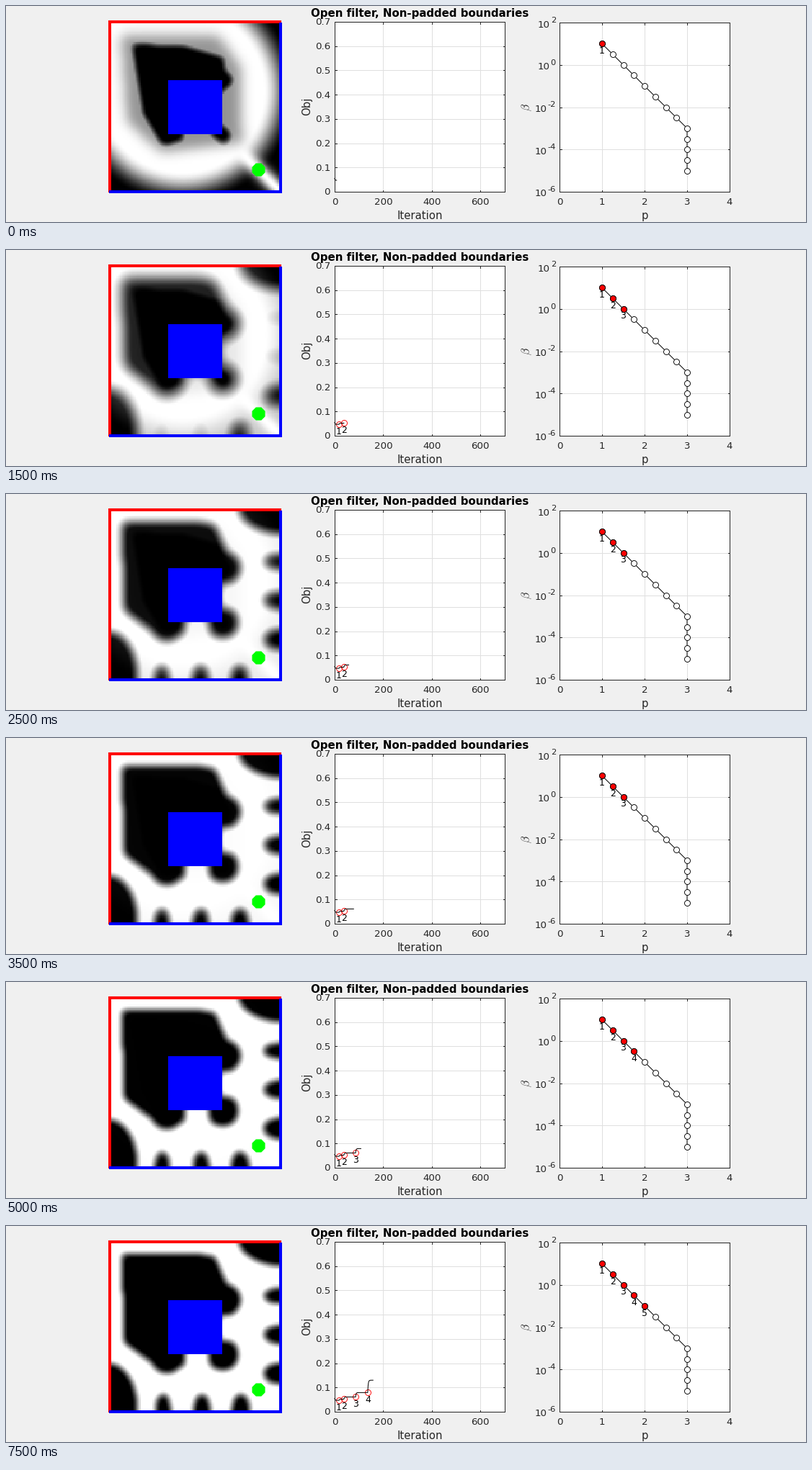
Write a matplotlib script that moves like this. It is 1110x300 px and loops after 8000 ms.

```python
import numpy as np
import matplotlib.pyplot as plt
from matplotlib.animation import FuncAnimation
from matplotlib.path import Path

W, H, DPI = 1110, 300, 100
FRAMES, INTERVAL = 16, 500
PT = 72 / DPI
INK, GRID = "#262626", "#dfdfdf"
plt.rcParams["font.family"] = "DejaVu Sans"
plt.rcParams["mathtext.fontset"] = "cm"

fig = plt.figure(figsize=(W / DPI, H / DPI), dpi=DPI, facecolor="#f0f0f0")
ax = fig.add_axes([0, 0, 1, 1])
ax.axis("off")


def line(xs, ys, color=INK, width=1, z=2, **kw):
    return ax.plot(xs, ys, color=color, lw=width * PT, zorder=z, **kw)[0]


def label(x, y, s, size=13.4, color=INK, ha="center", va="center_baseline", **kw):
    return ax.text(x, y, s, fontsize=size * PT, color=color, ha=ha, va=va,
                   zorder=8, **kw)


# ---- density field, in stage pixels ----------------------------------------
N, CELL, X0, Y0 = 100, 2.37, 144, 22
idx = np.arange(N)
gx, gy = np.meshgrid(X0 + CELL * (idx + 0.5), Y0 + CELL * (idx + 0.5))
centres = np.column_stack([gx.ravel(), gy.ravel()])

CORE_A = np.array([(172, 50), (250, 54), (306, 70), (300, 180), (215, 195), (188, 150)])
CORE_B = np.array([(160, 38), (288, 40), (306, 78), (300, 180), (218, 202), (164, 162)])
HALO = [(160, 42), (295, 42), (326, 85), (328, 190), (215, 203), (168, 160)]
LOBES = [(304, 103), (301, 179), (223, 183)]


def polygon(pts):
    return Path(pts).contains_points(centres).reshape(N, N)


def ellipse(x, y, rx, ry):
    return ((gx - x) / rx) ** 2 + ((gy - y) / ry) ** 2 < 1


def blur(m, sigma):
    k = np.exp(-((idx[:, None] - idx) / sigma) ** 2 / 2)
    k /= k.sum(1, keepdims=True)
    return k @ m @ k.T


def sharpen(m, gain=1.3):
    return np.clip(gain * (m - 0.5) + 0.5, 0, 1)


def core(s):
    """Dark body with three lobes and two bright channels, s from 0 to 1."""
    m = polygon(CORE_A + (CORE_B - CORE_A) * s)
    for x, y in LOBES:
        m |= ellipse(x, y, 13 + 9 * s, 13 + 9 * s)
    m &= ~((gx > 296) & (abs(gy - 142) < 18))
    m &= ~((gy > 170) & (abs(gx - 265) < 17))
    return m.astype(float)


def start_field():
    r = np.clip((np.hypot(gx - 245, gy - 118) - 112) / 45, 0, 1)
    rim = r * r * (3 - 2 * r) * np.clip((gx + gy - 290) / 60, 0, 1)
    rim *= 1 - np.exp(-((gx - gy - 123) / 16) ** 2)
    halo = 0.42 * blur(polygon(HALO), 3.5)
    return np.clip(np.maximum(sharpen(blur(core(0), 2.4)), halo) + rim, 0, 1)


START = start_field()
BODY = np.maximum(core(1), ellipse(385, 10, 66, 46) | ellipse(140, 250, 42, 60))


def late_field(k):
    s = np.clip((k - 5) / 10, 0, 1)
    grow = np.clip((k - 2) / 3, 0, 1)
    m = BODY.copy()
    for i in range(3):
        weight = 1 if i == 2 else grow
        right = ellipse(381, 94 + 54 * i + 3 * s, 24, 11 + 2 * i)
        bottom = ellipse(216 + 54 * i + 2 * s, 259, 11 + i, 22 + 4 * s)
        m = np.maximum(m, weight * (right | bottom))
    return sharpen(blur(m, 2.1 + 1.9 * np.exp(-max(k - 3, 0) / 2.5)))


def picture(k):
    fade = np.exp(-k / 2)
    return 1 - (late_field(k) * (1 - fade) + START * fade)


img = ax.imshow(picture(0), cmap="gray", vmin=0, vmax=1, aspect="auto",
                extent=(X0, X0 + N * CELL, Y0 + N * CELL, Y0),
                interpolation="nearest", zorder=1)
ax.set_xlim(0, W)
ax.set_ylim(H, 0)
ax.set_autoscale_on(False)
ax.fill([225, 300, 300, 225], [103, 103, 178, 178], color="blue", lw=0, zorder=2)
turn = np.pi / 8 + np.arange(8) * np.pi / 4
ax.fill(350.5 + 9.8 * np.cos(turn), 227.5 + 9.8 * np.sin(turn), color="lime",
        lw=0, zorder=2)
edge = dict(width=4, z=3, solid_joinstyle="miter", solid_capstyle="butt")
line([144, 144, 382], [259, 22, 22], "red", **edge)
line([143, 381, 381], [258, 258, 23], "blue", **edge)


# ---- plot panels -----------------------------------------------------------
def panel(x0, y0, x1, y1, xticks, yticks):
    ax.fill([x0, x1, x1, x0], [y0, y0, y1, y1], color="white", lw=0, zorder=1)
    for x in xticks:
        line([x, x], [y0, y1], GRID)
        for y, d in ((y0, 2.5), (y1, -2.5)):
            line([x, x], [y, y + d], z=3)
    for y in yticks:
        line([x0, x1], [y, y], GRID)
        for x, d in ((x0, 2.5), (x1, -2.5)):
            line([x, x + d], [y, y], z=3)
    line([x0, x1, x1, x0, x0], [y0, y0, y1, y1, y0], z=4)


def obj_xy(it, val):
    return 456 + np.asarray(it) * 236 / 700, 258 - np.asarray(val) * 236 / 0.7


def beta_xy(p, power):
    return 768 + np.asarray(p) * 59, 23 + (2 - np.asarray(power)) * 235 / 8


its, vals = np.arange(0, 700, 200), np.arange(8) / 10
panel(456, 22, 692, 258, obj_xy(its, 0)[0], obj_xy(0, vals)[1])
for it in its:
    label(obj_xy(it, 0)[0], 271, str(it))
for v in vals:
    label(450, obj_xy(0, v)[1] - 0.5, f"{v:g}", ha="right")
label(574.5, 15, "Open filter, Non-padded boundaries", 15, "black",
      va="baseline", weight="bold")
label(574.5, 296, "Iteration", 14.9, va="baseline")
label(417.5, 139.5, "Obj", 14.9, rotation=90, va="center")

powers = np.arange(2, -7, -2)
panel(768, 23, 1004, 258, beta_xy(np.arange(5), 0)[0], beta_xy(0, powers)[1])
for p in range(5):
    label(beta_xy(p, 0)[0], 271, str(p))
for e in powers:
    y = beta_xy(0, e)[1]
    label(763 - 4.2 * len(str(e)) - 3.8, y + 6.5, "10", ha="right", va="baseline")
    label(763, y, str(e), 11.5, ha="right", va="baseline")
label(886.5, 296, "p", 14.9, va="baseline")
label(722.5, 140, r"$\beta$", 15.5, rotation=90, va="center")

# ---- continuation path -----------------------------------------------------
step = np.arange(13)
px, py = beta_xy(np.minimum(1 + step / 4, 3), 1 - step / 2)
line(px, py, "black", z=5)
ring = dict(ls="", marker="o", ms=8 * PT, mew=0.9 * PT)
ax.plot(px, py, mfc="white", mec="black", zorder=6, **ring)
done, = ax.plot([], [], mfc="red", mec="black", zorder=7, **ring)

# ---- objective history -----------------------------------------------------
STOPS = [18, 38, 86, 136]
LEVELS = [0.055, 0.047, 0.052, 0.061, 0.079, 0.130]


def objective(it):
    """Each stage settles exponentially on its own level."""
    i = int(np.searchsorted(STOPS, it))
    age = it - (STOPS[i - 1] if i else 0)
    return LEVELS[i + 1] + (LEVELS[i] - LEVELS[i + 1]) * np.exp(-age / 2)


mx, my = obj_xy(STOPS, LEVELS[1:5])
curve = line([], [], "black", z=6)
marks, = ax.plot([], [], mfc="none", mec="red", zorder=5, **ring)


def tags(xs, ys):
    return [label(x, y + 13.5, str(i + 1), 12.5, "black", va="baseline")
            for i, (x, y) in enumerate(zip(xs, ys))]


done_tags, mark_tags = tags(px[:5], py), tags(mx, my)


def draw(k):
    img.set_data(picture(k))
    last = 8 + 10 * k
    n = int(np.searchsorted(STOPS, last, side="right"))
    hist = np.arange(0, last + 0.25, 0.5)
    curve.set_data(*obj_xy(hist, [objective(t) for t in hist]))
    marks.set_data(mx[:n], my[:n])
    done.set_data(px[:n + 1], py[:n + 1])
    for i, tag in enumerate(mark_tags):
        tag.set_visible(i < n)
    for i, tag in enumerate(done_tags):
        tag.set_visible(i <= n)
    return img, curve, marks, done


anim = FuncAnimation(fig, draw, frames=FRAMES, interval=INTERVAL,
                     init_func=lambda: draw(0), repeat=True, repeat_delay=0)
plt.show()
```
